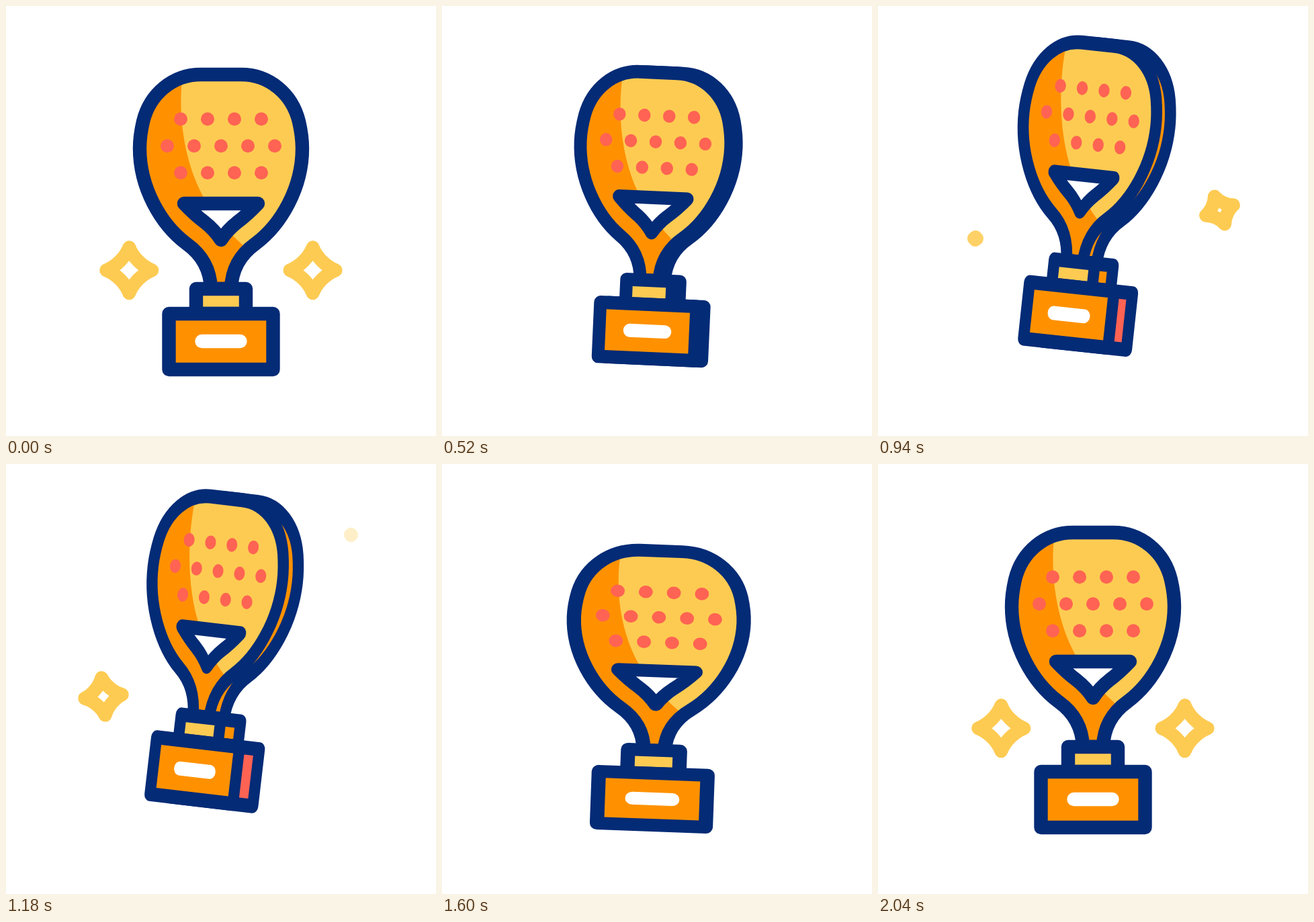
Recreate the animation shown at these times as an HTML page with a canvas. Size 640 by 640 pixels, loop 2400 ms.

```html
<!DOCTYPE html>
<html lang="en">
<head>
<meta charset="utf-8">
<title>Padel trophy</title>
<style>
html, body { margin: 0; width: 100%; height: 100%; overflow: hidden; background: #fff; }
canvas { display: block; width: 100vw; height: 100vh; }
</style>
</head>
<body>
<canvas id="stage" width="640" height="640"></canvas>
<script>
const ctx = document.getElementById('stage').getContext('2d');
const LOOP = 2400;
const NAVY = '#042b76', ORANGE = '#ff9100', YELLOW = '#fdcb52', RED = '#ff6353', WHITE = '#fff';
const MID = { x: 320, y: 321 };

const head = new Path2D(
  'M290 102H350C392 102 426 131 436 172C439 185 441 198 441 212' +
  'C441 270 410 325 371 354C350 369 336 390 335 421H305C304 390 290 369 269 354' +
  'C230 325 199 270 199 212C199 198 201 185 204 172C214 131 248 102 290 102Z');
const shade = new Path2D(
  'M263 100C254 175 270 243 296 288C312 316 334 341 362 364V430H180V100Z');
const throat = new Path2D('M265 294H375Q360 310 344 322Q330 333 320 348Q310 333 296 322Q280 310 265 294Z');
const neck = new Path2D('M283 421H357V458H283Z');
const base = new Path2D('M242.5 458H397.5V541H242.5Z');
const pill = new Path2D('M291.5 499H348.5');

const clamp = v => Math.min(1, Math.max(0, v));
const inOut = p => p * p * (3 - 2 * p);
const soar = p => 1 - Math.pow(1 - p, 2.75);

// time, easing towards this key, then centre x, centre y, x scale, y scale, tilt in degrees
const KEYS = [
  [220, inOut, 320, 321, 1, 1, 0],
  [370, inOut, 320, 333.5, 1, 0.936, 0],
  [1320, soar, 317, 275.7, 0.8, 1.027, 6.7],
  [1600, inOut, 319, 333, 1.045, 0.93, 2.1],
  [1830, inOut, 320, 301, 0.98, 1.03, 0],
  [2040, inOut, 320, 321, 1, 1, 0]
];

function poseAt(t) {
  const i = KEYS.findIndex(key => key[0] > t);
  if (i < 1) return KEYS[0].slice(2);
  const from = KEYS[i - 1], to = KEYS[i];
  const p = to[1]((t - from[0]) / (to[0] - from[0]));
  return to.slice(2).map((v, k) => from[k + 2] + (v - from[k + 2]) * p);
}

function part(path, fill) {
  ctx.fillStyle = fill;
  ctx.fill(path);
  ctx.stroke(path);
}

function dotRow(x, y, count) {
  ctx.fillStyle = RED;
  for (let i = 0; i < count; i++) {
    ctx.beginPath();
    ctx.arc(x + 40 * i, y, 10, 0, 2 * Math.PI);
    ctx.fill();
  }
}

function drawBackStand() {
  part(neck, ORANGE);
  part(base, RED);
}

function drawFront() {
  ctx.fillStyle = YELLOW;
  ctx.fill(head);
  ctx.save();
  ctx.clip(head);
  ctx.fillStyle = ORANGE;
  ctx.fill(shade);
  ctx.restore();
  ctx.stroke(head);
  dotRow(260, 168.3, 4);
  dotRow(240, 208.3, 5);
  dotRow(260, 248.3, 4);
  part(throat, WHITE);
  part(neck, YELLOW);
  part(base, ORANGE);
  ctx.strokeStyle = WHITE;
  ctx.stroke(pill);
}

function drawTrophy(t) {
  const [x, y, sx, sy, tilt] = poseAt(t);
  const depth = 150 * Math.max(0, 1 - sx);
  const layer = (shift, draw) => {
    ctx.save();
    ctx.translate(x, y);
    ctx.rotate(tilt * Math.PI / 180);
    ctx.translate(shift, 0);
    ctx.scale(sx, sy);
    ctx.translate(-MID.x, -MID.y);
    ctx.strokeStyle = NAVY;
    ctx.lineWidth = 20.4;
    draw();
    ctx.restore();
  };
  if (depth > 0) {
    // the racket is thinner than its stand
    layer(depth / 4, () => part(head, ORANGE));
    layer(depth / 2, drawBackStand);
  }
  layer(-depth / 2, drawFront);
}

// x, y, start of growth, growth time, start of vanishing
const SPARKLES = [
  [183.3, 393.3, 1605, 240, 220 + LOOP],
  [456.6, 393.3, 1690, 320, 380 + LOOP],
  [153, 123.5, 525, 320, 845],
  [508.5, 304, 720, 320, 1040],
  [145, 346, 910, 320, 1230],
  [513.5, 105.5, 1170, 320, 1490]
];
const VANISH = 55;

function star(size) {
  ctx.beginPath();
  ctx.moveTo(0, -34 * size);
  for (let i = 0; i < 4; i++) {
    const c = Math.round(Math.cos(i * Math.PI / 2)), s = Math.round(Math.sin(i * Math.PI / 2));
    const at = (px, py) => [(px * c - py * s) * size, (px * s + py * c) * size];
    ctx.bezierCurveTo(...at(5.5, -19.5), ...at(19.5, -5.5), ...at(34, 0));
  }
  ctx.closePath();
  ctx.stroke();
}

function drawSparkle([x, y, start, growth, end], t) {
  const now = t < end - LOOP + VANISH ? t + LOOP : t;
  const age = now - start;
  const left = 1 - clamp((now - end) / VANISH);
  if (age <= 0 || left <= 0) return;
  const p = clamp(age / growth);
  ctx.save();
  ctx.translate(x, y);
  ctx.rotate(inOut(p) * Math.PI / 2);
  ctx.globalAlpha = clamp(age / 35) * clamp(left * 2);
  ctx.strokeStyle = YELLOW;
  ctx.lineWidth = 20;
  star(Math.pow(p, 1.2) * left);
  ctx.restore();
}

function render(now) {
  const t = now % LOOP;
  ctx.fillStyle = WHITE;
  ctx.fillRect(0, 0, 640, 640);
  ctx.lineJoin = ctx.lineCap = 'round';
  drawTrophy(t);
  SPARKLES.forEach(s => drawSparkle(s, t));
}

const begin = performance.now();
function tick() {
  render(performance.now() - begin);
  requestAnimationFrame(tick);
}
tick();
</script>
</body>
</html>
```
